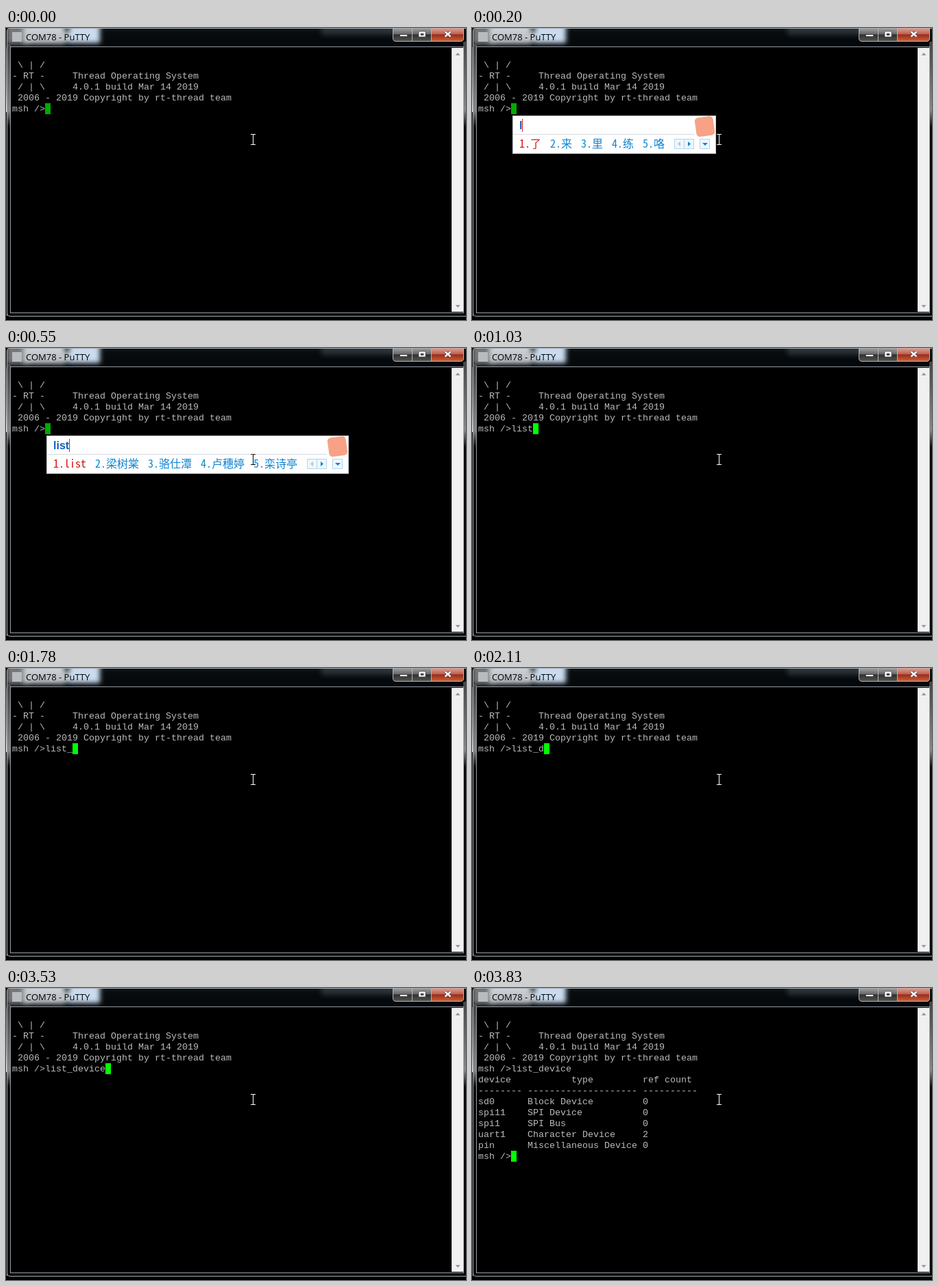
Recreate the animation shown at these times as an HTML page. Size 671 by 427 pixels, loop 8 s.

```html
<!DOCTYPE html>
<html lang="zh-CN">
<head>
<meta charset="utf-8">
<title>Serial terminal</title>
<style>
html, body { margin: 0; width: 100%; height: 100%; overflow: hidden; background: #000; }
svg { display: block; width: 100vw; height: 100vh; }
text { white-space: pre; }
.term { font: 13.333px "Liberation Mono", "Courier New", monospace; fill: #bbb; }
.title { font: 13px "Open Sans", sans-serif; fill: #000; }
.typed { font: bold 16px "Liberation Sans", Arial, sans-serif; fill: #1160bd; }
.cand { font: 16px "Noto Sans Mono CJK SC", "Noto Sans CJK SC", "Noto Sans CJK", monospace; fill: #0d84d2; }
.cand.first { fill: #dc1010; }
#mouse { mix-blend-mode: difference; }
</style>
</head>
<body>
<svg viewBox="0 0 671 427">
  <defs>
    <linearGradient id="bar" x2="0" y2="1">
      <stop offset="0" stop-color="#11161a"/><stop offset=".3" stop-color="#070b0e"/><stop offset="1" stop-color="#04070a"/>
    </linearGradient>
    <linearGradient id="side" x2="0" y2="1">
      <stop offset="0" stop-color="#444"/><stop offset=".6" stop-color="#888"/><stop offset="1" stop-color="#e4e4e4"/>
    </linearGradient>
    <linearGradient id="glass" x2="0" y2="1">
      <stop offset="0" stop-color="#444"/><stop offset=".6" stop-color="#777"/>
      <stop offset=".8" stop-color="#888"/><stop offset="1" stop-color="#080808"/>
    </linearGradient>
    <linearGradient id="btn" x2="0" y2="1">
      <stop offset="0" stop-color="#a2a2a2"/><stop offset=".46" stop-color="#686868"/>
      <stop offset=".5" stop-color="#303030"/><stop offset="1" stop-color="#555"/>
    </linearGradient>
    <linearGradient id="close" x2="0" y2="1">
      <stop offset="0" stop-color="#dda194"/><stop offset=".46" stop-color="#bd6152"/>
      <stop offset=".5" stop-color="#992b18"/><stop offset="1" stop-color="#c4663f"/>
    </linearGradient>
    <filter id="blur" x="-30%" y="-60%" width="160%" height="220%"><feGaussianBlur stdDeviation="3.5"/></filter>
    <clipPath id="barClip"><rect x="2" y="1" width="669" height="27"/></clipPath>
  </defs>

  <rect width="671" height="427" fill="#000"/>
  <rect y="28" width="2" height="95" fill="url(#side)"/>
  <rect x="2" y="0" width="669" height="421" fill="#080808"/>
  <rect x="2" y="0" width="669" height="28" fill="url(#bar)"/>
  <rect x="2" y="24" width="5" height="121" fill="url(#glass)"/>
  <rect x="667" y="20" width="4" height="125" fill="url(#glass)"/>
  <g clip-path="url(#barClip)">
    <g filter="url(#blur)">
      <rect x="0" y="-4" width="34" height="28" fill="#777"/>
      <rect x="26" y="-6" width="60" height="29" fill="#cfd2d5"/>
      <rect x="30" y="6" width="96" height="15" fill="#bfc5cb"/>
      <rect x="92" y="-6" width="45" height="28" fill="#c9dbee"/>
      <rect x="460" y="-6" width="110" height="16" fill="#2c3134"/>
    </g>
  </g>
  <path d="M1.5 421V4Q1.5 .5 5 .5H671M1.5 416Q1.5 421.5 6 421.5H671" fill="none" stroke="#a3adb3"/>
  <rect x="6.5" y="27.5" width="661" height="389" fill="#000" stroke="#959da2"/>

  <rect x="9" y="6" width="14" height="14" fill="#b8bcc0"/>
  <text class="title" x="29" y="18">COM78 - PuTTY</text>

  <g stroke="#b5b5b5">
    <path d="M564.5 0V15Q564.5 19.5 569 19.5H592.5V0Z" fill="url(#btn)"/>
    <path d="M592.5 0H620.5V19.5H592.5Z" fill="url(#btn)"/>
    <path d="M620.5 0H667.5V15Q667.5 19.5 663 19.5H620.5Z" fill="url(#close)"/>
  </g>
  <rect x="574.5" y="9.5" width="11" height="3" fill="#fff" stroke="#444"/>
  <path d="M602 5H612V13H602ZM605 8V10.5H609V8Z" fill="#fff" fill-rule="evenodd" stroke="#444" stroke-width=".7"/>
  <path d="M640.5 5.5L648.5 12.5M648.5 5.5L640.5 12.5" stroke="#533" stroke-width="4"/>
  <path d="M640.5 5.5L648.5 12.5M648.5 5.5L640.5 12.5" stroke="#fff" stroke-width="2.4"/>

  <rect x="650" y="29" width="17" height="386" fill="#f0f0f0"/>
  <path d="M655.5 40L659 36L662.5 40ZM655.5 405L659 409L662.5 405Z" fill="#9a9a9a"/>

  <g id="lines"></g>
  <rect id="caret" width="8" height="16"/>
  <g id="ime"></g>
  <path id="mouse" d="M357 155.5H364M360.5 156V170M357 170.5H364" fill="none" stroke="#fff"/>
</svg>
<script>
const LOOP = 8000, COL = 8, ROW = 16, LEFT = 9, TOP = 30;
const $ = id => document.getElementById(id);

const banner = [
  '',
  ' \\ | /',
  '- RT -     Thread Operating System',
  ' / | \\     4.0.1 build Mar 14 2019',
  ' 2006 - 2019 Copyright by rt-thread team'
];
const prompt = 'msh />', command = 'list_device';
const row = (name, type, count) => name.padEnd(9) + type.padEnd(21) + count;
const table = [
  row('device', '        type', 'ref count'),
  row('-'.repeat(8), '-'.repeat(20), '-'.repeat(10)),
  row('sd0', 'Block Device', 0),
  row('spi11', 'SPI Device', 0),
  row('spi1', 'SPI Bus', 0),
  row('uart1', 'Character Device', 2),
  row('pin', 'Miscellaneous Device', 0)
];

// Input method popup: start time, typed letters, candidates
const popups = [
  [200, 'l', '了 来 里 练 咯'],
  [300, 'li', '里 李 离 理 力'],
  [370, 'lis', '历史 理事 厉声 离散 lis'],
  [550, 'list', 'list 梁树棠 骆仕潭 卢穗婷 栾诗亭']
];
const commit = 1030, enter = 3830;
const keys = [1780, 2110, 2570, 2890, 3110, 3280, 3530];

const esc = s => s.replace(/&/g, '&amp;').replace(/</g, '&lt;').replace(/>/g, '&gt;');
const text = (cls, x, y, s) => `<text class="${cls}" x="${x}" y="${y}">${esc(s)}</text>`;
const rect = (x, y, w, h, attrs) => `<rect x="${x}" y="${y}" width="${w}" height="${h}" ${attrs}/>`;
const cellWidth = ch => ch.charCodeAt(0) < 256 ? 8 : 16;

function candidates(words) {
  let x = 69, out = '';
  words.split(' ').forEach((word, i) => {
    const label = `${i + 1}.${word}`, xs = [];
    for (const ch of label) {
      xs.push(x);
      x += cellWidth(ch);
    }
    out += text(i ? 'cand' : 'cand first', xs.join(' '), 175, label);
    x += 13;
  });
  return { out, end: x + 1 };
}

function popup([, typed, words]) {
  const { out, end } = candidates(words);
  const right = end + 61;
  const caretX = 69.5 + Math.round([...typed].reduce((w, c) => w + 16 * ({ s: .556, t: .333 }[c] || .278), 0));
  const box = 'fill="#eef7fd" stroke="#b3d6ee"';
  return rect(59.5, 128.5, right - 60, 55, 'fill="#fff" stroke="#c3cbd4"') +
    rect(60, 155, right - 92, 1, 'fill="#d4dae0"') +
    rect(right - 30, 130, 27, 28, `rx="5" fill="#f7a286" transform="rotate(-8 ${right - 16.5} 144)"`) +
    text('typed', 69, 148, typed) +
    rect(caretX - .5, 133, 1, 19, 'fill="#e02020"') +
    out +
    rect(end + .5, 162.5, 28, 14, box) +
    rect(end + 14, 163, 1, 13, 'fill="#b3d6ee"') +
    rect(end + 37.5, 162.5, 14, 14, box) +
    `<path d="M${end + 9} 166v7l-4 -3.5Z" fill="#b8c4cc"/>` +
    `<path d="M${end + 20} 166v7l4 -3.5ZM${end + 41} 168h8l-4 4Z" fill="#0d84d2"/>`;
}

const popupMarkup = popups.map(popup);
let lastKey = '';

function draw(t) {
  const count = t < commit ? 0 : 4 + keys.filter(k => k <= t).length;
  const done = t >= enter;
  const open = t < commit ? popups.filter(p => p[0] <= t).length : 0;
  const key = [count, done, open].join();
  if (key === lastKey) return;
  lastKey = key;

  const lines = [...banner, prompt + command.slice(0, count)];
  if (done) lines.push(...table, prompt);
  $('lines').innerHTML = lines.map((s, i) => text('term', LEFT, TOP + 12 + i * ROW, s)).join('');

  const last = lines.length - 1;
  $('caret').setAttribute('x', LEFT + lines[last].length * COL);
  $('caret').setAttribute('y', TOP + last * ROW);
  $('caret').setAttribute('fill', t < commit ? '#00aa00' : '#00ff00');
  $('ime').innerHTML = open ? popupMarkup[open - 1] : '';
}

const start = performance.now();
function tick() {
  draw((performance.now() - start) % LOOP);
  requestAnimationFrame(tick);
}
draw(0);
requestAnimationFrame(tick);
</script>
</body>
</html>
```
